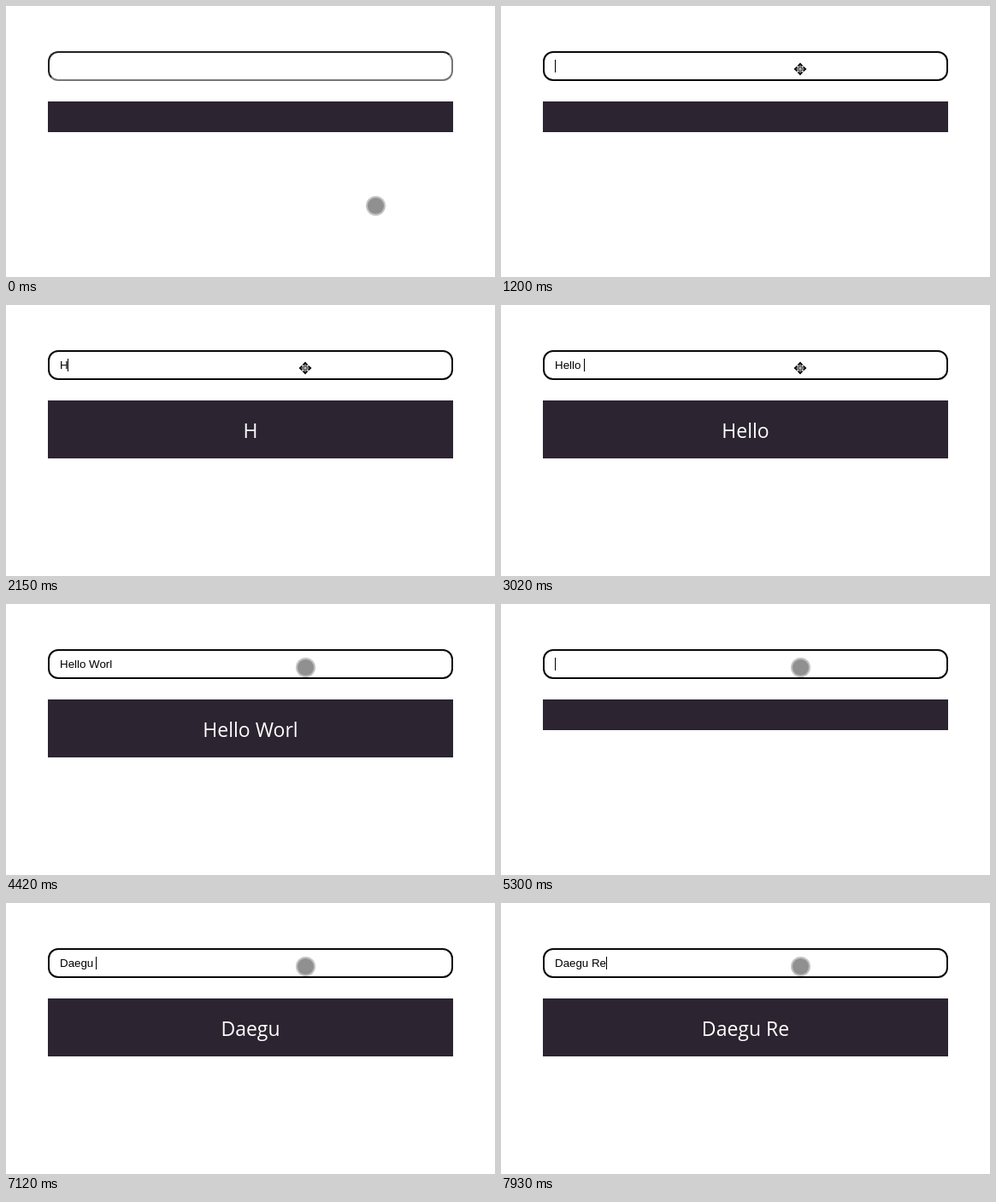
Recreate the animation shown at these times as an HTML page with a canvas. Size 572 by 318 pixels, loop 8 s.

```html
<!DOCTYPE html>
<html lang="en">
<head>
<meta charset="utf-8">
<title>Live text preview</title>
<style>
  html, body { margin: 0; width: 100%; height: 100%; overflow: hidden; background: #fff; }
  #stage { position: relative; width: 572px; height: 318px; overflow: hidden; background: #fff; }
  #stage > * { position: absolute; box-sizing: border-box; white-space: pre; }
  #field {
    left: 49px; top: 53px; width: 474px; height: 35px; padding: 8px 12px;
    border: 2px inset #767676; border-radius: 12px;
    font: 13.333px/15px "Liberation Sans", Arial, "Noto Sans CJK KR", "Noto Sans CJK", sans-serif;
    color: #000;
  }
  #field.focus { border: 2px solid #080808; }
  #panel {
    left: 49px; top: 112px; width: 474px; height: 36px; padding-top: 19px;
    background: #2c2430; color: #fff; text-align: center;
    font: 23px/32px "Open Sans", "Noto Sans CJK KR", "Noto Sans CJK", sans-serif;
  }
  canvas { left: 0; top: 0; }
</style>
</head>
<body>
<div id="stage">
  <div id="field"></div>
  <div id="panel"></div>
  <canvas id="overlay" width="572" height="318"></canvas>
</div>
<script>
const LOOP = 8000;
const field = document.getElementById('field');
const panel = document.getElementById('panel');
const ctx = document.getElementById('overlay').getContext('2d');

// [start time, field content]
const typing = [
  [0, ''], [1330, 'ㅗ'], [1600, 'ㅗㄷ'], [1820, 'ㅗ'], [1890, ''],
  [2150, 'H'], [2290, 'He'], [2420, 'Hel'], [2620, 'Hell'], [2820, 'Hello'],
  [3020, 'Hello '], [3150, 'Hello W'], [3220, 'Hello Wo'], [3340, 'Hello Wor'],
  [3490, 'Hello Worl'], [3560, 'Hello World'], [4420, 'Hello Worl'],
  [4950, 'Hello Wor'], [5020, 'Hello W'], [5090, 'Hello'], [5160, 'Hel'],
  [5230, 'H'], [5300, ''],
  [5580, 'D'], [6240, 'Da'], [6370, 'Dae'], [6720, 'Daeg'], [6850, 'Daegu'],
  [7050, 'Daegu '], [7190, 'Daegu R'], [7590, 'Daegu Re'],
  [7860, 'Daegu R'], [7930, 'Daegu Re']
];

const between = (t, a, b) => t >= a && t < b;

function textAt(t) {
  let text = '';
  for (const [start, value] of typing) if (t >= start) text = value;
  return text;
}

function bezier(u, a, b, c, d) {
  const v = 1 - u;
  return v * v * v * a + 3 * v * v * u * b + 3 * v * u * u * c + u * u * u * d;
}

function pointerAt(t) {
  const step = t < 140 ? 0 : Math.min(11, Math.floor((t - 140) / 79) + 1);
  const p = step / 11;
  const u = p * p * (3 - 2 * p);
  return [bezier(u, 432.5, 428, 352, 350.5), bezier(u, 234.5, 190, 130, 74.5)];
}

function disc(x, y, r, color) {
  ctx.fillStyle = color;
  ctx.beginPath();
  ctx.arc(x, y, r, 0, Math.PI * 2);
  ctx.fill();
}

function drawDisc(x, y) {
  disc(x, y, 11.5, '#c2c2c2');
  disc(x, y, 9.6, '#909090');
}

function drawMoveCursor(x, y) {
  ctx.save();
  ctx.translate(x, y);
  ctx.fillStyle = '#000';
  ctx.fillRect(-5, -1.5, 10, 3);
  ctx.fillRect(-1.5, -5, 3, 10);
  for (let i = 0; i < 4; i++) {
    ctx.beginPath();
    ctx.moveTo(0, -7.5);
    ctx.lineTo(3.6, -3.6);
    ctx.lineTo(-3.6, -3.6);
    ctx.fill();
    ctx.rotate(Math.PI / 2);
  }
  ctx.fillStyle = '#fff';
  ctx.fillRect(-4.5, -0.5, 9, 1);
  ctx.fillRect(-0.5, -4.5, 1, 9);
  ctx.restore();
}

function render(t) {
  const text = textAt(t);
  if (field.textContent !== text) {
    field.textContent = text;
    panel.textContent = text.trim();
  }
  field.className = t >= 860 ? 'focus' : '';
  panel.style.height = text ? '68px' : '36px';

  ctx.clearRect(0, 0, 572, 318);
  if (t >= 1200 && !between(t, 4090, 4620)) {
    ctx.font = '13.333px "Liberation Sans", Arial, "Noto Sans CJK KR", "Noto Sans CJK", sans-serif';
    ctx.fillStyle = '#000';
    ctx.fillRect(63 + Math.floor(ctx.measureText(text).width), 63, 1, 15);
  }
  const [x, y] = pointerAt(t);
  if (between(t, 1000, 3080)) drawMoveCursor(350, 74);
  else drawDisc(x, y);
}

const origin = performance.now();
function tick() {
  render((performance.now() - origin) % LOOP);
  requestAnimationFrame(tick);
}
render(0);
requestAnimationFrame(tick);
</script>
</body>
</html>
```
